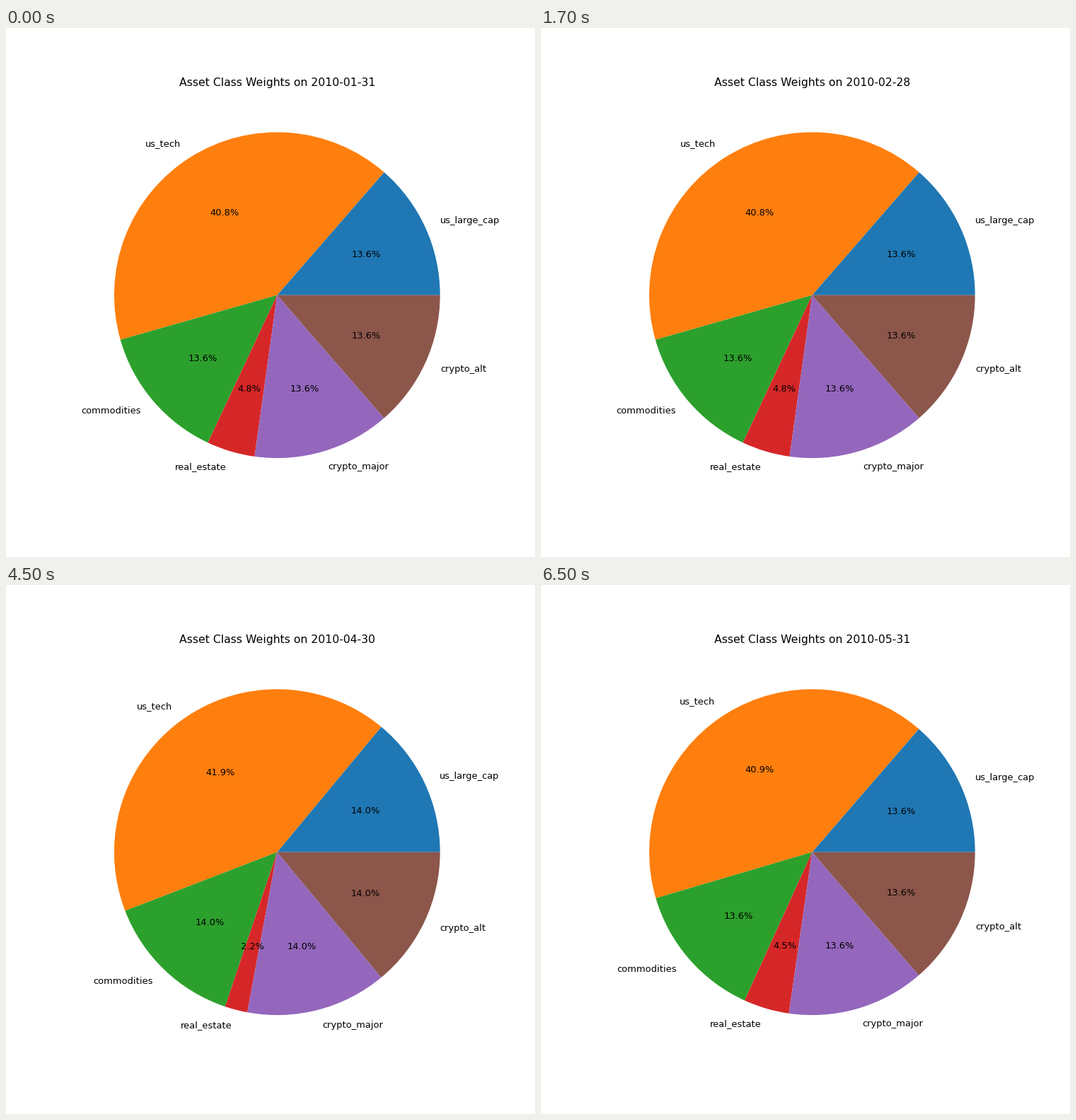
These frames come from a looping animation (748 by 748 pixels, 8 s). A matplotlib script:

```python
import matplotlib.pyplot as plt
from matplotlib.animation import FuncAnimation

INCHES, DPI = 8, 93.5  # 748 x 748 pixels
STEP_MS, LOOP_MS = 500, 8000
STEPS_PER_MONTH = 4

LABELS = ["us_large_cap", "us_tech", "commodities",
          "real_estate", "crypto_major", "crypto_alt"]
# Month end and the real estate share; the other classes split the rest.
MONTHS = [("2010-01-31", 0.0478),
          ("2010-02-28", 0.0478),
          ("2010-03-31", 0.0199),
          ("2010-04-30", 0.0224),
          ("2010-05-31", 0.0452)]


def class_weights(real_estate):
    """Tech holds three of the seven equal parts left by real estate."""
    part = (1 - real_estate) / 7
    return [part, 3 * part, part, real_estate, part, part]


plt.rcParams["font.family"] = "DejaVu Sans"
fig, ax = plt.subplots(figsize=(INCHES, INCHES), dpi=DPI)


def draw(step):
    # The loop opens on the last step of the first month.
    date, real_estate = MONTHS[(step + STEPS_PER_MONTH - 1) // STEPS_PER_MONTH]
    ax.clear()
    ax.pie(class_weights(real_estate), labels=LABELS, autopct="%1.1f%%")
    ax.set_title(f"Asset Class Weights on {date}")
    return []


anim = FuncAnimation(fig, draw, frames=LOOP_MS // STEP_MS, interval=STEP_MS,
                     init_func=lambda: draw(0), repeat=True, repeat_delay=0)
plt.show()
```
